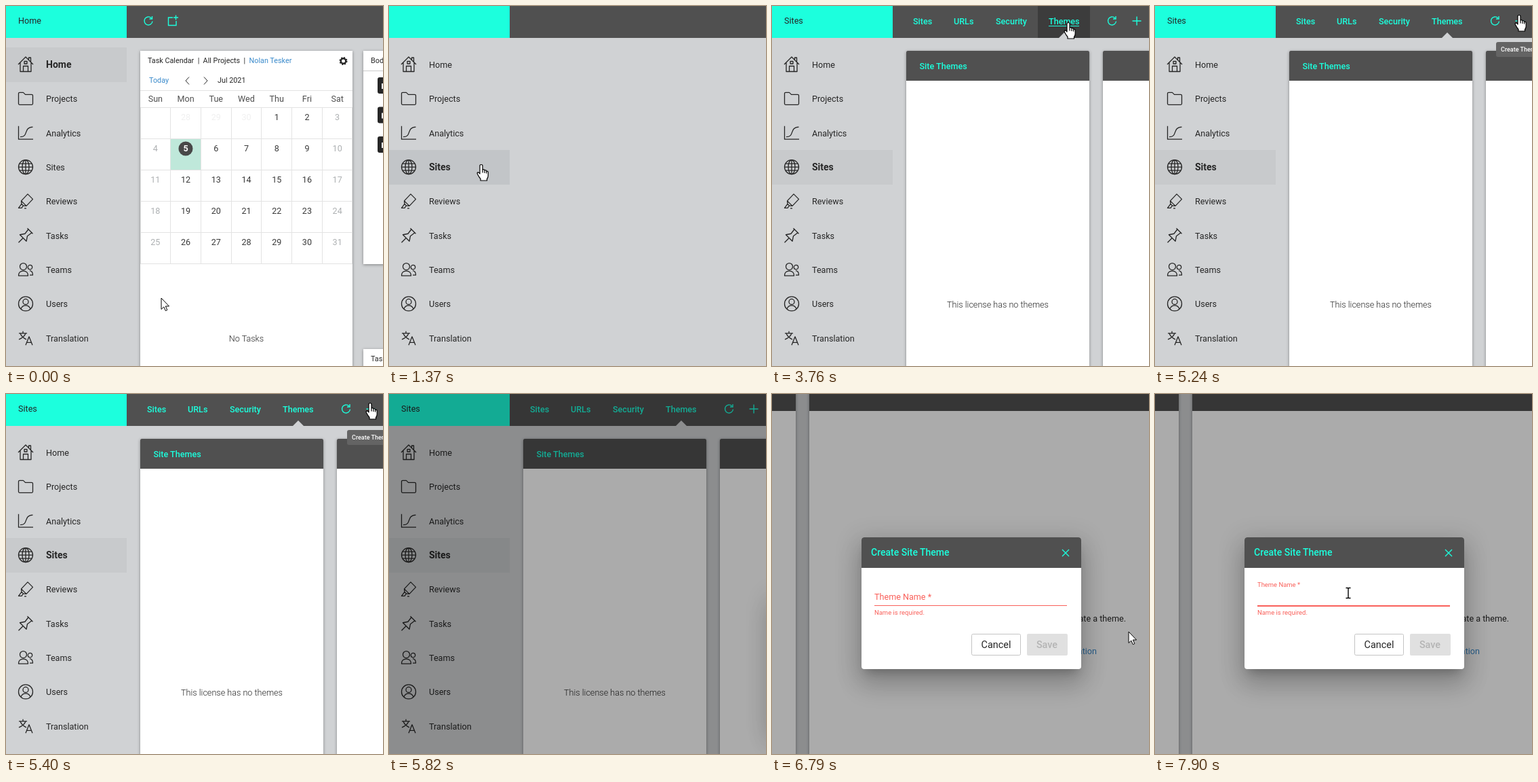
Write an HTML page that moves like this. It is 556 px wide and 530 px high and loops after 8000 ms.

```html
<!DOCTYPE html>
<html lang="en">
<head>
<meta charset="utf-8">
<title>Create a site theme</title>
<style>
html, body { margin: 0; width: 100%; height: 100%; overflow: hidden; background: #d0d2d4; }
svg { display: block; width: 556px; height: 530px; font: 12.6px Roboto, sans-serif; fill: #262626; }
.line { fill: none; stroke: #262626; stroke-width: 1.3; stroke-linejoin: round; }
.cyan { fill: #1cffdd; font-weight: 500; }
.cyan-line { fill: none; stroke: #1cffdd; stroke-width: 1.4; }
.muted-line { fill: none; stroke: #a0a0a0; stroke-width: 1.2; }
.link { fill: #3a8acb; }
.small { font-size: 10.8px; }
.light { font-weight: 300; }
.mid { text-anchor: middle; }
.dark { fill: #505050; }
.card { fill: #fff; filter: drop-shadow(0 1px 2px rgba(0,0,0,.38)); }
.rule { fill: none; stroke: #e3e3e3; }
.error { fill: #f9605a; }
.active { font-weight: 700; font-size: 14px; }
.shade { filter: blur(7px); }
.shade.soft { filter: blur(18px); }
</style>
</head>
<body>
<svg viewBox="0 0 556 530">
<defs>
  <g id="house"><path d="M-11 0L0-11 11 0M-8-3V10.5H8V-3M-3.5 10.5V2.5H3.5V10.5M4.5-6.5V-10H7.5V-3.5M-2-4.5H2V-1H-2Z"/></g>
  <g id="folder"><path d="M-10.5 7.5V-7.5Q-10.5-9-9-9H-3.5L-.5-6H9Q10.5-6 10.5-4.5V7.5Q10.5 9 9 9H-9Q-10.5 9-10.5 7.5Z"/></g>
  <g id="chart"><path d="M-10.5-10V9.5H11M-8 6C5 6-4-8 10.5-8.5"/></g>
  <g id="globe"><circle r="10.5"/><ellipse rx="5" ry="10.5"/><path d="M0-10.5V10.5M-10.5 0H10.5M-9-5H9M-9 5H9"/></g>
  <g id="marker"><path d="M3-10.5L10.5-3 1 7-6.5-.5ZM-6.5-.5L-6 4-3.5 6.5 1 7M-6 4L-10.5 10H-6L-3.5 6.5M-2 10.5H1"/></g>
  <g id="pin"><path d="M2.5-10.5L10.5-2.5M4-9L-1-2.5-8.5-1 1 8.5 2.5 1 9-4M-4 4L-10.5 10.5"/></g>
  <g id="people"><circle cx="-3.5" cy="-4.5" r="5"/><path d="M-10.5 9Q-10.5 2-3.5 2T3.5 9ZM6 1.5Q10.5 2 10.5 8H6"/><circle cx="6.5" cy="-3.5" r="3.2"/></g>
  <g id="person"><circle r="10.5"/><circle cy="-3" r="4"/><path d="M-7 7.5Q-5 2.5 0 2.5T7 7.5"/></g>
  <g id="letters"><path d="M-10-7H2M-4-10V-7M0-7Q-2-1-10 2M-8-7Q-6-1 1 2M0 10.5L5-2 10 10.5M1.5 6.5H8.5"/></g>
  <g id="refresh"><path d="M4.3-4.3A6 6 0 1 0 6 .5M5.5-7V-3H1.5"/></g>
  <g id="plus"><path d="M-6.5 0H6.5M0-6.5V6.5"/></g>
  <g id="funnel"><path d="M-7-6H7L2 0V6L-2 4V0Z"/></g>
  <g id="gear"><circle r="3.7" stroke-width="2.4"/><circle r="5" stroke-width="2" stroke-dasharray="2 1.93"/></g>
</defs>

<g id="page">
  <rect width="1100" height="700" fill="#d0d2d4"/>
  <rect width="1100" height="47" class="dark"/>
  <rect width="178" height="47" fill="#1cffdd"/>
  <text x="18" y="26" data-on="0-1230">Home</text>
  <text x="18" y="26" data-on="1610-8000">Sites</text>
  <g id="menu"></g>

  <g data-on="0-1230">
    <g class="cyan-line"><use href="#refresh" x="210" y="22"/><path d="M246 17H239.500V28.500H251V22M247 17H254M250.500 13.500V20.500"/></g>
    <rect x="198" y="66" width="313" height="500" class="card"/>
    <g class="small">
      <text x="209" y="84">Task Calendar &#160;|&#160; All Projects &#160;|&#160; <tspan class="link">Nolan Tesker</tspan></text>
      <text x="211" y="113" class="link">Today</text>
      <text x="312" y="113">Jul 2021</text>
    </g>
    <path d="M270 104.500L265 110 270 115.500M292 104.500L297 110 292 115.500" class="line" style="stroke-width:1"/>
    <use href="#gear" x="497.500" y="81" fill="none" stroke="#262626"/>
    <g id="calendar"></g>
    <text x="354.500" y="494" class="mid light">No Tasks</text>
    <rect x="527" y="66" width="80" height="314" class="card"/>
    <rect x="527" y="505" width="80" height="80" class="card"/>
    <path d="M527 95.500H600" class="rule" style="stroke:#ccc"/>
    <text x="538" y="84" class="small">Body</text>
    <text x="538" y="523" class="small">Tasks</text>
    <g id="badges"></g>
  </g>

  <g data-on="1610-8000">
    <rect x="392" width="77" height="47" fill="#3c3c3c" data-on="2860-4400"/>
    <g class="cyan">
      <text x="208" y="27">Sites</text><text x="268" y="27">URLs</text>
      <text x="330" y="27">Security</text><text x="408" y="27">Themes</text>
    </g>
    <path d="M408 29.500H453" class="cyan-line" style="stroke-width:1" data-on="2860-4400"/>
    <path d="M214 47L222 39 230 47Z" fill="#d0d2d4" data-on="0-3220"/>
    <path d="M423 47L431 39 439 47Z" fill="#d0d2d4" data-on="3220-8000"/>
  </g>

  <g data-on="1780-3220">
    <rect x="214" y="66" width="400" height="500" class="card"/>
    <rect x="214" y="66" width="400" height="44" class="dark"/>
    <g class="cyan-line"><use href="#refresh" x="237" y="88"/><use href="#plus" x="274" y="88"/><use href="#gear" x="417.500" y="88" stroke-width="1"/></g>
    <g class="muted-line">
      <path d="M303 95L304 91 311 84 314 87 307 94ZM309.500 82.500L315.500 88.500M312 85L315 81 317 83 313.500 86.500"/>
      <g transform="translate(345 87) scale(.62)"><use href="#globe"/></g>
      <path d="M346 96V89H343L347.500 84 352 89H349V96Z" fill="#a0a0a0" stroke="#505050"/>
      <path d="M375 84H388M377 84V95H386V84M379.500 84V81.500H383.500V84"/>
    </g>
    <g class="line" style="stroke-width:1.100"><rect x="236.500" y="128.500" width="13" height="13" rx="1"/><use href="#funnel" x="375" y="135"/><use href="#funnel" x="465" y="135"/></g>
    <path d="M442 130V139M438.500 136L442 139.500 445.500 136" class="line" style="stroke-width:1.800"/>
    <text x="322" y="139" class="small">Live</text>
    <text x="403" y="139" class="small">Name</text>
    <path d="M214 160.500H600" stroke="#bdbdbd"/>
    <g id="rows" data-on="1960-3220"></g>
  </g>

  <g data-on="3340-8000">
    <g class="cyan-line"><use href="#refresh" x="501.500" y="22"/><use href="#plus" x="538" y="22"/></g>
    <rect x="198" y="66" width="270" height="620" rx="2" class="card"/>
    <rect x="488" y="66" width="560" height="620" rx="2" class="card"/>
    <path d="M198 110V68Q198 66 200 66H466Q468 66 468 68V110ZM488 110V68Q488 66 490 66H1048V110Z" class="dark"/>
    <text x="217.500" y="93" class="cyan">Site Themes</text>
    <text x="333" y="444" class="mid light" data-on="3460-8000">This license has no themes</text>
    <text x="955" y="420" text-anchor="end">Select or create a theme.</text>
    <text x="912" y="468" text-anchor="end" class="link">Documentation</text>
    <g data-on="5240-5680">
      <rect x="503" y="53" width="74" height="22" rx="3" fill="#646464"/>
      <text x="510" y="67" font-size="9" font-weight="500" fill="#fff">Create Theme</text>
    </g>
  </g>

  <rect id="veil" width="1100" height="700" fill="#000"/>

  <g data-on="5680-8000">
    <rect x="558" y="297" width="338" height="208" class="shade soft" opacity=".13" fill="#000"/>
    <rect x="563" y="316" width="328" height="200" class="shade soft" opacity=".14" fill="#000"/>
    <rect x="571" y="312" width="312" height="182" class="shade" opacity=".2" fill="#000"/>
    <rect x="565" y="296" width="324" height="194" rx="4" fill="#fff"/>
    <path d="M565 341V300Q565 296 569 296H885Q889 296 889 300V341Z" class="dark"/>
    <text x="579" y="323" font-size="14" class="cyan">Create Site Theme</text>
    <path d="M861 314L871 324M871 314L861 324" class="cyan-line"/>
    <text id="label" class="error">Theme Name *</text>
    <rect x="584" y="396" width="284" height="1" class="error"/>
    <rect id="underline" y="396" height="2" class="error"/>
    <path d="M584.500 374V389" stroke="#f9605a" data-on="7400-7900"/>
    <text x="584" y="410" font-size="9.450" class="error">Name is required.</text>
    <rect x="727.500" y="438.500" width="72" height="31" rx="2" fill="#fff" stroke="#c4c4c4"/>
    <rect x="809" y="438" width="60" height="32" rx="2" fill="#e0e0e0"/>
    <g font-size="14.400" class="mid"><text x="763.500" y="459">Cancel</text><text x="838.500" y="459" fill="#b4b4b4" font-weight="500">Save</text></g>
  </g>
</g>

<g id="pointer" stroke="#000" fill="#fff" stroke-linejoin="round">
  <path data-kind="arrow" d="M0 0V16.500L3.800 13 6.300 18.700 8.800 17.600 6.300 12H11.500Z"/>
  <path data-kind="hand" stroke-width="1.200" d="M-2 1.500Q-2-.5 0-.5T2 1.500V7Q4.500 5.800 5 8Q7.300 7 7.700 9.200Q10.200 8.700 10.200 11V16Q10 19 8.500 20.500V23H-1V20.500Q-3.500 17.500-5.500 13.500Q-6.500 11-4.500 10.800Q-3.300 11-2 13ZM2 7V11.500M5 8V12M7.700 9.200V12.500"/>
  <path data-kind="beam" fill="none" stroke-width="1.400" d="M-3.500-7.500H-1Q0-7.500 0-6.500Q0-7.500 1-7.500H3.500M0-6.500V6.500M-3.500 7.500H-1Q0 7.500 0 6.500Q0 7.500 1 7.500H3.500"/>
</g>
</svg>
<script>
const LOOP = 8000, ROW = 50.35;
const $ = id => document.getElementById(id);
const repeat = (n, draw) => Array.from({ length: n }, (_, i) => draw(i)).join('');

const menu = [['Home', 'house'], ['Projects', 'folder'], ['Analytics', 'chart'], ['Sites', 'globe'], ['Reviews', 'marker'],
  ['Tasks', 'pin'], ['Teams', 'people'], ['Users', 'person'], ['Translation', 'letters']];
$('menu').innerHTML = menu.map(([name, icon], i) => `
  <rect y="${Math.round(61 + ROW * i)}" width="178" height="51"/>
  <use href="#${icon}" class="line" x="29" y="${86 + ROW * i}"/>
  <text x="59" y="${Math.round(91 + ROW * i)}">${name}</text>`).join('');

const colW = 313 / 7, colX = c => 198 + colW * (c + .5);
$('calendar').innerHTML =
  '<rect x="243" y="195" width="44.500" height="46" fill="#bfe8da"/><circle cx="265" cy="210" r="10.500" fill="#484848"/>' +
  ['Sun', 'Mon', 'Tue', 'Wed', 'Thu', 'Fri', 'Sat'].map((d, c) =>
    `<text x="${colX(c)}" y="141" class="mid" fill="#505050">${d}</text>`).join('') +
  repeat(35, i => {
    const day = i - 3, col = i % 7, weekend = col % 6 === 0;
    const fill = day < 1 ? '#f0f0f0' : day === 5 ? '#fff' : weekend ? '#adb0b2' : '#3a3a3a';
    return i ? `<text x="${colX(col)}" y="${168 + 46 * Math.floor(i / 7)}" class="mid" fill="${fill}"
      font-weight="${day === 5 ? 700 : 400}">${day < 1 ? day + 30 : day}</text>` : '';
  }) +
  `<path class="rule" d="M198 124.500H511${repeat(6, r => `M198 ${149.5 + 46 * r}H511`)}${
    repeat(8, c => `M${Math.min(510.5, Math.floor(198 + colW * c) + .5)} 149V380`)}"/>`;

$('badges').innerHTML = repeat(3, i => `<g transform="translate(548 ${105 + 43.5 * i})">
  <rect width="28" height="24" rx="3"/><path d="M7 9V17" stroke="#fff" stroke-width="2"/></g>`);

const sites = ['2 - Private', '2 - HTML5', '1 PDF V1', '1 HTML5 V2', '1 HTML5', '1 Help V3', '1 Help V2', '1 Help V1', '1 Guide'];
$('rows').innerHTML = sites.map((name, i) => `<g transform="translate(0 ${Math.round(183 + 44.15 * i)})">
  <rect x="236.500" y="-6.500" width="13" height="13" rx="1" class="line" style="stroke-width:1.100"/>
  ${repeat(3, d => `<circle cx="290" cy="${d * 5.5 - 6}" r="1.600" fill="#fff" stroke="#6b4630"/>`)}
  <g transform="translate(328 -2) scale(.59)"><use href="#globe" class="line" style="stroke:#1d3c55"/></g>
  <rect x="404" y="-14" width="28" height="24" rx="3" fill="#fff" stroke="#000" stroke-width="2"/>
  <path d="M404-6.500H432" stroke="#000" stroke-width="1.500"/><path d="M407-10.500H415" stroke="#000" stroke-width="2" stroke-dasharray="2 1"/>
  <text x="418" y="6" class="mid" font-size="10.500">MOD</text>
  <text x="448" y="2" class="link">Mod ${name}</text>
  ${i > 1 ? '<path d="M557 0H555.500V5" class="line" style="stroke-width:1;stroke:#777"/>' : ''}
  <path d="M214 21.500H600" stroke="#bdbdbd"/></g>`).join('');

// Tracks hold each value until the next entry: [time, ...values]
const pointerTrack = [
  [0, 229, 430, 'arrow'], [390, 225, 416, 'arrow'], [530, 205, 366, 'arrow'], [670, 174, 308, 'hand'],
  [810, 150, 262, 'hand'], [950, 138, 238, 'hand'], [1090, 136, 234, 'hand'],
  [2500, 139, 192, 'hand'], [2620, 205, 132, 'arrow'], [2740, 310, 74, 'arrow'], [2860, 396, 38, 'hand'],
  [2980, 432, 27, 'hand'], [3760, 437, 25, 'hand'], [4000, 445, 25, 'hand'], [4130, 454, 24, 'hand'],
  [4270, 463, 23, 'hand'], [4400, 473, 22, 'arrow'], [4530, 483, 21, 'arrow'], [4670, 492, 21, 'hand'],
  [4800, 497, 20, 'hand'], [4950, 514, 18, 'arrow'], [5095, 530, 15, 'hand'], [5240, 537, 14, 'hand'],
  [5680, 600, 60, 'arrow'], [6680, 526, 350, 'arrow'], [6800, 440, 328, 'arrow'], [6930, 360, 308, 'arrow'],
  [7060, 304, 296, 'beam'], [7180, 285, 293, 'beam']];
const panTrack = [[0, 0, 0], [6250, -140, -31], [6400, -279, -62], [6550, -400, -80], [6680, -433, -85]];
const veilTrack = [[0, 0], [5540, .14], [5680, .27], [5820, .33]];
const focusTrack = [[0, 0], [7300, .1], [7400, .5], [7500, .85], [7600, 1]];
const held = (track, t) => track.filter(k => k[0] <= t).pop().slice(1);

const timed = [...document.querySelectorAll('[data-on]')].map(el => [el, ...el.dataset.on.split('-').map(Number)]);
const kinds = [...document.querySelectorAll('[data-kind]')];
const rowBoxes = $('menu').querySelectorAll('rect'), rowTexts = $('menu').querySelectorAll('text');

function render(t) {
  for (const [el, from, to] of timed) el.style.display = t >= from && t < to ? '' : 'none';

  const [x, y, kind] = held(pointerTrack, t);
  $('pointer').setAttribute('transform', `translate(${x} ${y})`);
  kinds.forEach(el => el.style.display = el.dataset.kind === kind ? '' : 'none');

  const active = t < 1230 ? 0 : 3, hover = x < 178 ? Math.floor((y - 61) / ROW) : -1;
  rowBoxes.forEach((box, i) => {
    box.setAttribute('fill', i === hover ? '#c2c5c8' : i === active ? '#c8cacc' : 'none');
    rowTexts[i].classList.toggle('active', i === active);
  });

  $('page').setAttribute('transform', `translate(${held(panTrack, t).join(' ')})`);
  $('veil').setAttribute('opacity', held(veilTrack, t)[0]);

  const [focus] = held(focusTrack, t);
  $('label').setAttribute('transform', `translate(584 ${388 - 19 * focus}) scale(${1 - .25 * focus})`);
  $('underline').setAttribute('x', 726 - 142 * focus);
  $('underline').setAttribute('width', 284 * focus);
}

const start = performance.now();
function tick() {
  render((performance.now() - start) % LOOP);
  requestAnimationFrame(tick);
}
tick();
</script>
</body>
</html>
```
